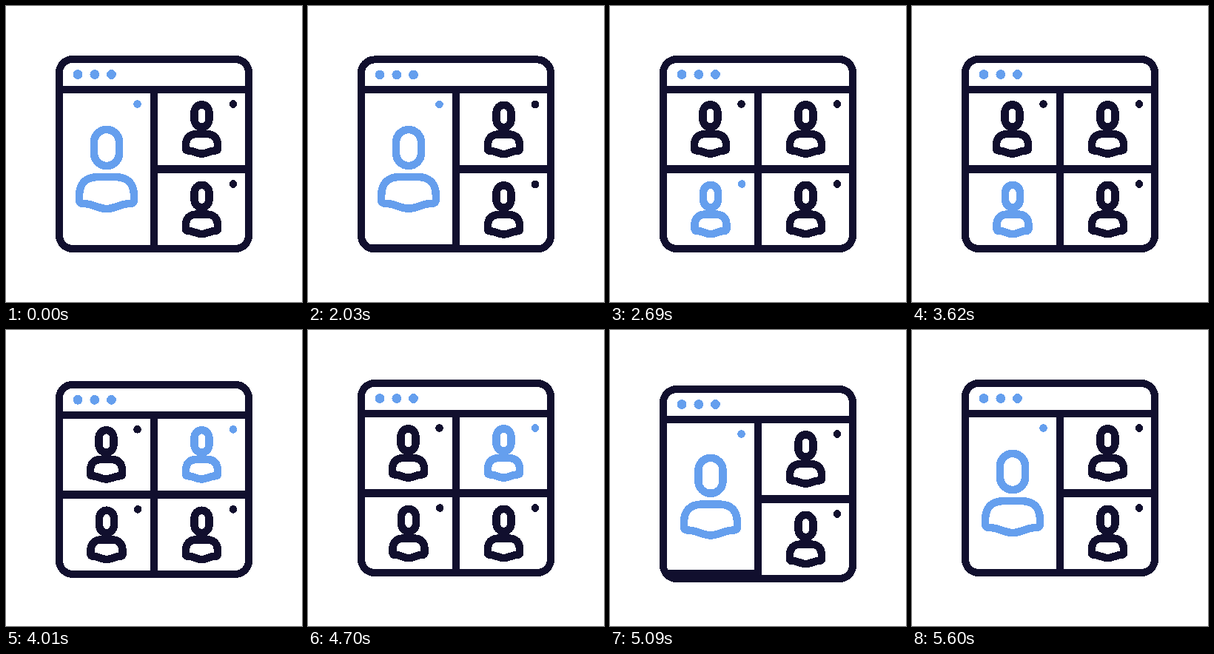
An HTML page for the animation above (5.66 s loop, 400x400 px).

```html
<!DOCTYPE html>
<html lang="en">
<head>
<meta charset="utf-8">
<title>Video call layout</title>
<style>
  html, body { margin: 0; height: 100%; overflow: hidden; background: #fff; }
  svg { display: block; width: 400px; height: 400px; shape-rendering: crispEdges; }
  .line { fill: none; stroke: #110f2e; stroke-width: 10; }
  .divider { stroke-width: 11; }
  .person { fill: none; stroke: currentColor; stroke-width: 10.5; stroke-linejoin: round; }
  #person * { vector-effect: non-scaling-stroke; }
  .dot { fill: currentColor; }
  .menu { fill: #659fee; }
</style>
</head>
<body>
<svg viewBox="0 0 400 400">
  <defs>
    <g id="person">
      <rect x="-17" y="-53.5" width="34" height="49" rx="17"/>
      <path d="M-32 46.5Q-37 46.5-37 41.500V36.500Q-37 10.500-11 10.500H11Q37 10.500 37 36.500V41.500Q37 46.500 32 46.500C18 46.500 12 53.500 0 53.500C-12 53.500-18 46.500-32 46.500Z"/>
    </g>
    <clipPath id="pane"><rect x="72" y="72" width="256" height="256" rx="18"/></clipPath>
  </defs>
  <g id="window">
    <g id="topLeft"></g>
    <g clip-path="url(#pane)">
      <g id="lower">
        <path class="line divider" d="M72 220.500H200"/>
        <g id="bottomLeft"></g>
      </g>
    </g>
    <g id="topRight"></g>
    <g id="bottomRight"></g>
    <rect class="line" x="72" y="72" width="256" height="256" rx="18"/>
    <path class="line" d="M72 113H328M200 113V328"/>
    <path class="line divider" d="M200 220.500H328"/>
    <g class="menu">
      <circle cx="97" cy="92.500" r="6.400"/>
      <circle cx="119.800" cy="92.500" r="6.400"/>
      <circle cx="142.500" cy="92.500" r="6.400"/>
    </g>
  </g>
</svg>
<script>
const LOOP = 5660, SPLIT = 2000, SWAP = 3720, MERGE = 4700, MOVE = 900;
const DARK = [17, 15, 46], BLUE = [101, 159, 238];
const SMALL_X = 0.585, SMALL_Y = 0.62;

const $ = id => document.getElementById(id);
const ramp = (t, start, length) => Math.min(1, Math.max(0, (t - start) / length));
const smooth = u => (1 - Math.cos(Math.PI * u)) / 2;
const mix = (a, b, k) => a + (b - a) * k;

// Quick start with a long, soft landing
const glide = u => 1 - (1 - u ** 2.2) ** 16;

// Down and back up again
const dip = (t, start, down, up) =>
  smooth(ramp(t, start, down)) - smooth(ramp(t, start + down, up));

const within = (t, ...spans) => spans.some(([from, to]) => t >= from && t < to);

function addTile(id, dotX, dotY) {
  $(id).innerHTML =
    `<g class="person"><use href="#person"/></g><circle class="dot" cx="${dotX}" cy="${dotY}" r="5.300"/>`;
  const [person, dot] = $(id).children;
  return {
    place(x, y, sx = SMALL_X, sy = SMALL_Y) {
      person.setAttribute("transform", `translate(${x} ${y}) scale(${sx} ${sy})`);
    },
    paint(blue) {
      $(id).style.color = `rgb(${DARK.map((c, i) => Math.round(mix(c, BLUE[i], blue)))})`;
    },
    showDot(on) { dot.style.visibility = on ? "visible" : "hidden"; }
  };
}

const topLeft = addTile("topLeft", 177.5, 132.5);
const bottomLeft = addTile("bottomLeft", 178.2, 240.5);
const topRight = addTile("topRight", 307, 132.5);
const bottomRight = addTile("bottomRight", 307, 240.5);

bottomLeft.place(136, 275);
topRight.place(264.5, 166.5);
bottomRight.place(264.5, 275);
bottomRight.paint(0);

function draw(t) {
  const split = glide(ramp(t, SPLIT, MOVE)) - glide(ramp(t, MERGE, MOVE));
  const drop = 10.6 * (dip(t, SPLIT, 240, 460) + dip(t, MERGE, 240, 460))
    + 3 * dip(t, SWAP, 170, 290);
  const swapped = ramp(t, SWAP + 20, 240);
  const merged = ramp(t, MERGE + 30, 210);

  $("window").setAttribute("transform", `translate(0 ${drop})`);
  $("lower").setAttribute("transform", `translate(0 ${108 * (1 - split)})`);
  topLeft.place(mix(136, 135.5, split), mix(220.5, 166.5, split),
    mix(1, SMALL_X, split), mix(1, SMALL_Y, split));

  topLeft.paint(1 - ramp(t, SPLIT + 30, 210) + merged);
  bottomLeft.paint(1 - swapped);
  topRight.paint(swapped - merged);

  bottomLeft.showDot(!within(t, [3140, 3320], [3620, 3800]));
  topRight.showDot(!within(t, [4310, 4520], [4790, 4970]));
}

function tick() {
  draw(performance.now() % LOOP);
  requestAnimationFrame(tick);
}
tick();
</script>
</body>
</html>
```
